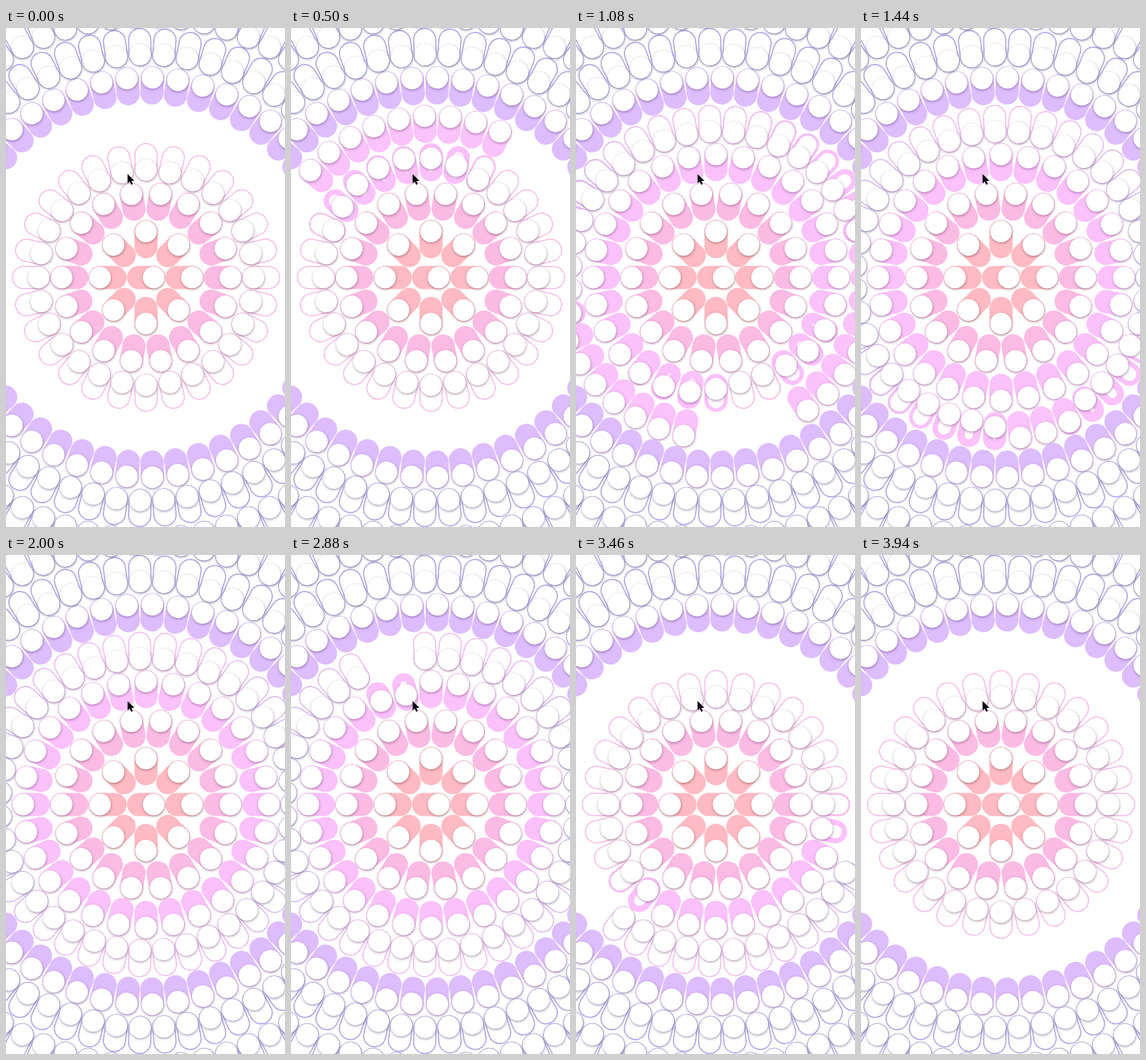
An HTML page with a canvas that plays this animation: 373 by 666 pixels, repeating every 3.96 s.

```html
<!DOCTYPE html>
<html lang="en">
<head>
<meta charset="utf-8">
<title>Rings of switches</title>
<style>
  html, body { margin: 0; width: 100%; height: 100%; overflow: hidden; background: #fff; }
  canvas { display: block; }
</style>
</head>
<body>
<canvas id="stage" width="373" height="666"></canvas>
<script>
const ctx = document.getElementById('stage').getContext('2d');
const LOOP = 3960, CX = 187.2, CY = 333;
const GAP = 51.3;                       // distance between rings
const W = 51, H = 31, KNOB = 14.5, TRAVEL = 10.3, BORDER = 1.5;
const COUNTS = [1, 8, 18, 28, 39, 49, 59, 70];

// hue, saturation, lightness of each ring, switched on and off
const ON = [[352, 100, 86.5], [352, 100, 86.5], [322, 92, 86.2], [300, 88, 87],
            [299, 88, 87.5], [270, 100, 87], [249, 57, 77], [246, 50, 77]];
const OFF_3 = [316, 72, 85], OFF_4_TOP = [304, 62, 84], OFF_4_SIDE = [256, 56, 82];

const mix = (a, b, p) => a.map((v, i) => v + (b[i] - v) * p);
const hsl = ([h, s, l], alpha = 1) => `hsl(${h} ${s}% ${l}% / ${alpha})`;

// cubic-bezier(.25, .1, .25, 1)
function ease(x) {
  if (x <= 0) return 0;
  if (x >= 1) return 1;
  let lo = 0, hi = 1, s;
  for (let i = 0; i < 14; i++) {
    s = (lo + hi) / 2;
    if (.75 * s * (1 - s) + s ** 3 < x) lo = s; else hi = s;
  }
  return .3 * s * (1 - s) ** 2 + 3 * s * s * (1 - s) + s ** 3;
}

// time since a wave, running both ways round from `centre`, reached switch k
function since(t, start, step, centre, k, n) {
  const d = Math.abs(k - centre) % n;
  return t - start - Math.min(d, n - d) * step;
}

// border colour: turns to the full colour early while the fill grows
const tone = (off, on, fill) => mix(off, on, Math.min(1, fill * 4));

// knob and fill: 0 off, 1 on; tint colours the middle; null when the switch is absent
function state(ring, k, n, a, t) {
  if (ring === 3) {
    const on = since(t, 267, 60, 8.42, k, n);
    const off = since(t, 2815, 61.5, 8.42, k, n);
    const fill = ease(on / 330) - ease(off / 190);
    return {
      knob: ease(on / 330) - ease(off / 100),
      fill,
      tint: off < 0 ? ease(on / 600) : 0,
      color: tone(OFF_3, ON[3], fill)
    };
  }
  if (ring === 4) {
    if (since(t, 284, 46, 11.15, k, n) < 0 || since(t, 2834, 46, 11.15, k, n) >= 0) return null;
    const off = since(t, 609, 44.6, 11.4, k, n);
    const fill = 1 - ease(off / 400);
    const rest = mix(OFF_4_TOP, OFF_4_SIDE, Math.cos(a) ** 2);
    return { knob: 1 - ease(off / 100), fill, tint: 0, color: tone(rest, ON[4], fill) };
  }
  const v = ring < 6 ? 1 : 0;
  return { knob: v, fill: v, tint: v, color: ON[ring] };
}

function pill(inset, color) {
  const w = W - 2 * inset, h = H - 2 * inset;
  if (h <= 0) return;
  ctx.fillStyle = color;
  ctx.beginPath();
  ctx.roundRect(-w / 2, -h / 2, w, h, h / 2);
  ctx.fill();
}

function drawSwitch(r, a, s) {
  ctx.save();
  ctx.translate(CX, CY);
  ctx.rotate(-a);
  ctx.translate(r, 0);
  pill(0, hsl(s.color));
  if (s.fill < 1) pill(BORDER + s.fill * (H / 2 - BORDER), hsl([0, 0, 100], 1 - s.tint));

  ctx.shadowColor = hsl([s.color[0], 32, 32], .55);
  ctx.shadowBlur = 3.5;
  ctx.shadowOffsetX = .4;
  ctx.shadowOffsetY = 1.2;
  ctx.fillStyle = '#fff';
  ctx.beginPath();
  ctx.arc((2 * s.knob - 1) * TRAVEL, 0, KNOB, 0, 2 * Math.PI);
  ctx.fill();
  ctx.restore();
}

const arrow = new Path2D('M162.5 194.8V207.6L165.4 204.9L167.4 209.2L169.6 208.2L167.7 204.1H171.7Z');

function draw(t) {
  ctx.fillStyle = '#fff';
  ctx.fillRect(0, 0, 373, 666);
  COUNTS.forEach((n, ring) => {
    for (let k = 0; k < n; k++) {
      const a = 2 * Math.PI * k / n;
      const s = state(ring, k, n, a, t);
      if (s) drawSwitch(ring * GAP, a, s);
    }
  });
  ctx.strokeStyle = '#fff';
  ctx.lineWidth = 1;
  ctx.stroke(arrow);
  ctx.fillStyle = '#0b0612';
  ctx.fill(arrow);
}

const begin = performance.now();
function frame() {
  draw((performance.now() - begin) % LOOP);
  requestAnimationFrame(frame);
}
frame();
</script>
</body>
</html>
```
